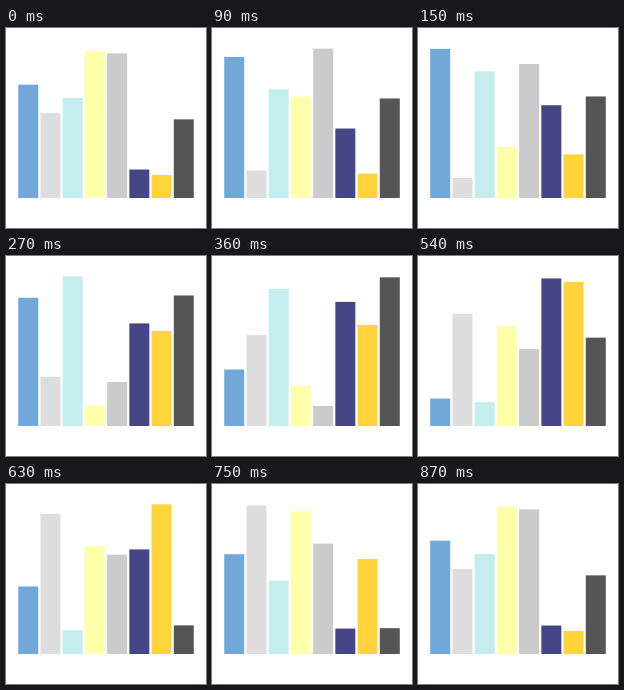
A matplotlib script for the animation above (900 ms loop, 200x200 px).

```python
import matplotlib.pyplot as plt
import numpy as np
from matplotlib.animation import FuncAnimation
from matplotlib.patches import Rectangle

SIZE = 200
FRAMES = 30
BASE = 170
WIDTH = 20
PITCH = SIZE / 9

HEIGHTS = [100, 150, 20, 100]
# colour and phase (in eighths of the cycle) of each bar
BARS = [
    ("#72a7da", 1), ("#dddddd", 4), ("#c4edf0", 0), ("#fffea9", 3),
    ("#cbcbcb", 2), ("#464686", 6), ("#ffd33a", 5), ("#555555", 7),
]

# cubic Bezier easing (0.5, 0, 0.5, 1)
S = np.linspace(0, 1, 401)
EASE_X = 1.5 * S * (1 - S) + S**3
EASE_Y = 3 * S**2 - 2 * S**3


def height(phase):
    part = (phase % 1) * 3
    k = min(int(part), 2)
    eased = np.interp(part - k, EASE_X, EASE_Y)
    return HEIGHTS[k] + (HEIGHTS[k + 1] - HEIGHTS[k]) * eased


fig = plt.figure(figsize=(2, 2), dpi=100, facecolor="white")
ax = fig.add_axes([0, 0, 1, 1])
ax.set_xlim(0, SIZE)
ax.set_ylim(SIZE, 0)
ax.axis("off")

rects = []
for i, (color, _) in enumerate(BARS):
    x = PITCH * (i + 1) - WIDTH / 2
    rect = Rectangle((x, BASE), WIDTH, 0, facecolor=color, linewidth=0, snap=False)
    rects.append(ax.add_patch(rect))


def update(n):
    # the last frame closes the cycle on the opening pose
    t = n / (FRAMES - 1)
    for rect, (_, eighths) in zip(rects, BARS):
        rect.set_height(-height(t + eighths / 8))
    return rects


anim = FuncAnimation(fig, update, frames=FRAMES, init_func=lambda: update(0),
                     interval=30, repeat=True, repeat_delay=0)
plt.show()
```
